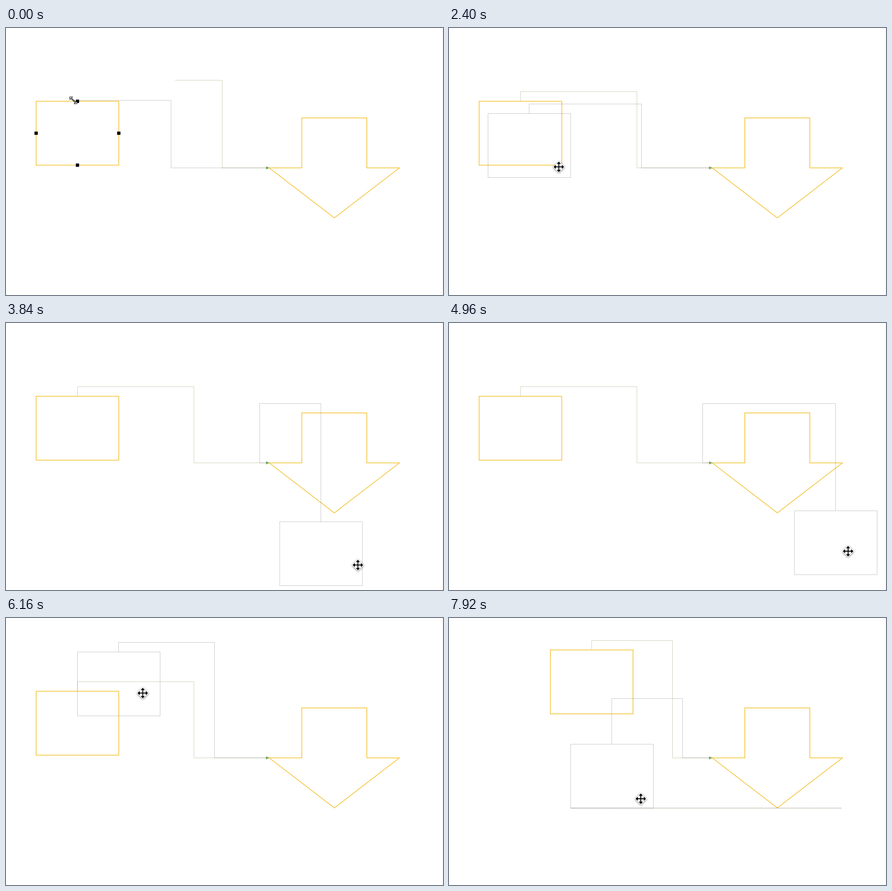
Recreate the animation shown at these times as an HTML page with a canvas. Size 957x585 px, loop 8 s.

```html
<!DOCTYPE html>
<html>
<head>
<meta charset="utf-8">
<style>
html, body { margin: 0; width: 100%; height: 100%; overflow: hidden; background: #fff; }
canvas { display: block; }
</style>
</head>
<body>
<canvas id="stage" width="957" height="585"></canvas>
<script>
const ctx = document.getElementById('stage').getContext('2d');
const LOOP = 8000, STEP = 80, LAG = 80, GAP = 20.5;
const W = 181, H = 140, GRAB = [136, 90];
const HOME = [66, 160.5], MOVED = [222, 70];
const ARROW = { x: 719, y: 197, halfW: 142.5, halfH: 109.5 };
const END = [ARROW.x - ARROW.halfW, ARROW.y + ARROW.halfH];
const GOLD = '#f3c12f', LINK = '#d0d1b9', GHOST = '#c9c9cb';

// Turning points of the pointer: time, x, y
const PATH = [
  [0, 147.5, 158.5], [1040, 155, 161], [1520, 169, 197], [2240, 202, 250],
  [2880, 356, 467], [2960, 389, 477], [4000, 840, 540], [4880, 893, 502],
  [4960, 874, 500], [5280, 868, 498], [5520, 708, 281], [5600, 683, 217],
  [6080, 293, 165], [6880, 358, 160], [7200, 358, 160], [7840, 403, 367], [7920, 420, 396]
];

function pointerAt(t) {
  const i = PATH.findIndex(key => key[0] > t);
  if (i < 0) return PATH[PATH.length - 1].slice(1);
  const [t0, x0, y0] = PATH[i - 1], [t1, x1, y1] = PATH[i];
  const k = (t - t0) / (t1 - t0);
  return [x0 + (x1 - x0) * k, y0 + (y1 - y0) * k];
}

// The dragged outline trails the pointer
function ghostAt(t) {
  return pointerAt(t - LAG).map((v, i) => snap(v - GRAB[i]));
}

const snap = v => Math.ceil(v) - 0.5;
const middle = (a, b) => [(a[0] + b[0]) / 2, (a[1] + b[1]) / 2];

function poly(points, { stroke, fill, width = 1, close = true }) {
  ctx.beginPath();
  points.forEach(p => ctx.lineTo(...p));
  if (close) ctx.closePath();
  if (fill) { ctx.fillStyle = fill; ctx.fill(); }
  if (stroke) { ctx.strokeStyle = stroke; ctx.lineWidth = width; ctx.stroke(); }
}

function line(points, stroke) {
  poly(points.map(p => p.map(snap)), { stroke, close: false });
}

// Connector from a loose end
function elbow([x, y]) {
  const mid = (x + END[0]) / 2;
  return [[x, y], [mid, y], [mid, END[1]], END];
}

// Connector from the top of a box
function route([x, y]) {
  const cx = x + W / 2, [ex, ey] = END;
  if (y > ey + GAP && cx < ex - GAP) return [[cx, y], [cx, ey], END];
  const top = Math.min(y, ARROW.y) - GAP;
  const mid = x + W < ex ? (x + W + ex) / 2 : Math.min(x, ex) - GAP;
  return [[cx, y], [cx, top], [mid, top], [mid, ey], END];
}

function box([x, y], stroke, width) {
  ctx.strokeStyle = stroke;
  ctx.lineWidth = width;
  ctx.strokeRect(x, y, W, H);
}

function square([x, y], r, fill, stroke) {
  poly([[x - r, y - r], [x + r, y - r], [x + r, y + r], [x - r, y + r]], { fill, stroke });
}

function diamond([x, y], r, fill, stroke) {
  poly([[x, y - r], [x + r, y], [x, y + r], [x - r, y]], { fill, stroke });
}

function blockArrow() {
  const { x, y, halfW, halfH } = ARROW;
  const side = s => [[x + s * halfW / 2, y], [x + s * halfW / 2, y + halfH], [x + s * halfW, y + halfH]];
  poly([...side(1), [x, y + 2 * halfH], ...side(-1).reverse()], { stroke: GOLD, width: 1.5 });
}

function shadow(on) {
  ctx.shadowColor = on ? 'rgba(0,0,0,.55)' : 'transparent';
  ctx.shadowBlur = on ? 4 : 0;
  ctx.shadowOffsetY = on ? 1 : 0;
}

function resizeCursor() {
  const half = [[-8, -7.5], [-2, -7.5], [-4, -5.2], [5.2, 4], [7.5, 2]];
  poly([...half, ...half.map(([x, y]) => [-x, -y])], { fill: '#fff', stroke: '#111', width: 1.2 });
}

function moveCursor() {
  shadow(true);
  diamond([0, 0], 13, '#fff');
  shadow(false);
  for (let i = 0; i < 4; i++) {
    poly([[0, -11.5], [4.5, -6.5], [1, -6.5], [1, 0], [-1, 0], [-1, -6.5], [-4.5, -6.5]], { fill: '#000' });
    ctx.rotate(Math.PI / 2);
  }
}

function hoverCursor() {
  moveCursor();
  shadow(true);
  poly([[-2, -4], [-2, 10], [1.4, 7], [4, 12], [6.7, 10.8], [4.4, 6], [9, 6]],
    { fill: '#000', stroke: '#fff', width: 1.5 });
  shadow(false);
}

function draw(t) {
  ctx.fillStyle = '#fff';
  ctx.fillRect(0, 0, 957, 585);
  line([[957, 0], [957, 585]], '#eeeeee');

  const linking = t < 960, selected = !linking && t < 1920;
  const dragging = (t >= 2320 && t < 7040) || t >= 7200;
  const home = t < 7040 ? HOME : MOVED;
  const pointer = pointerAt(t), link = route(home);

  line(linking ? elbow([371, 114.5]) : link, LINK);
  box(home, GOLD, 1.5);
  blockArrow();

  ctx.globalCompositeOperation = 'multiply';
  if (linking) line(t < 240 ? elbow(pointer) : link, GHOST);
  if (dragging) {
    const ghost = ghostAt(t);
    line(route(ghost), GHOST);
    box(ghost, GHOST, 1);
    if (t >= 7840) {
      ctx.setLineDash([2, 1.6]);
      line([[ghost[0], 416.5], [861, 416.5]], '#7d6a50');
      ctx.setLineDash([]);
    }
  }
  ctx.globalCompositeOperation = 'source-over';

  const [ex, ey] = END;
  poly([[ex - 7, ey - 3.5], [ex + 0.5, ey], [ex - 7, ey + 3.5]], { fill: '#78a45c' });

  if (linking) {
    for (let i = 0; i < 4; i++) {
      const a = i * Math.PI / 2;
      square([home[0] + W / 2 * (1 + Math.cos(a)), home[1] + H / 2 * (1 + Math.sin(a))], 3.6, '#000');
    }
  }
  if (selected) {
    [link[0], END].forEach(p => square(p, 4.2, '#27a52a', '#3f6b3f'));
    [1, 2].forEach(i => diamond(middle(link[i], link[i + 1]), 5.2, '#e3bd3f', '#5b4b2c'));
  }

  ctx.save();
  ctx.translate(...pointer);
  if (t < 1040) resizeCursor();
  else if (t < 2320 || (t >= 6960 && t < 7200)) hoverCursor();
  else moveCursor();
  ctx.restore();
}

function tick() {
  const t = performance.now() % LOOP;
  draw(Math.floor(t / STEP) * STEP);
  requestAnimationFrame(tick);
}
tick();
</script>
</body>
</html>
```
